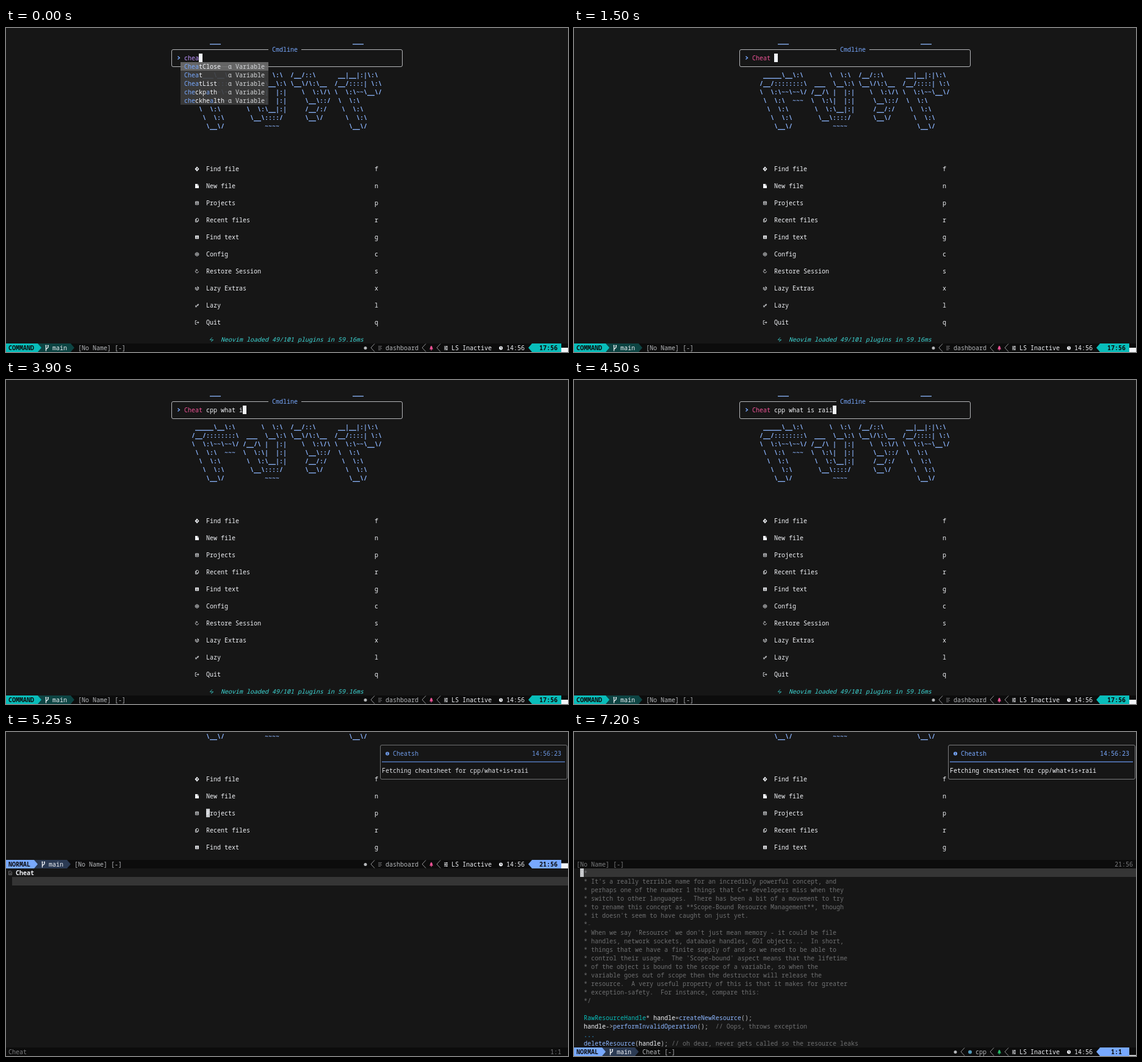
Recreate the animation shown at these times as an HTML page with a canvas. Size 921x532 px, loop 8000 ms.

```html
<!DOCTYPE html>
<html lang="en">
<head>
<meta charset="utf-8">
<title>Cheatsheet lookup in a terminal editor</title>
<style>
html, body { margin: 0; height: 100%; overflow: hidden; background: #161616; }
canvas { display: block; }
</style>
</head>
<body>
<canvas id="stage" width="921" height="532"></canvas>
<script>
const ctx = document.getElementById('stage').getContext('2d');
const W = 921, H = 532, LOOP = 8000, CELL = 6, LINE = 14;
const FONT = '10px "Noto Sans Mono", "DejaVu Sans Mono", monospace';
const C = {
  bg: '#161616', bar: '#0c0c0c', fg: '#f2f4f8', soft: '#b6b8bb', dim: '#7b7c7e', comment: '#6e6f70',
  blue: '#78a9ff', sky: '#8cb6ff', teal: '#08bdba', cyan: '#3ddbd9', pink: '#ee5396',
  purple: '#be95ff', green: '#25be6a', line: '#353535'
};

const BANNER = [
  [1, '     ___                                    ___'],
  [5, String.raw` _____\__\:\       \  \:\  /__/::\      __|__|:|\:\ `],
  [6, String.raw`/__/::::::::\  ___  \__\:\ \__\/\:\__  /__/::::| \:\ `],
  [7, String.raw`\  \:\~~\~~\/ /__/\ |  |:|    \  \:\/\ \  \:\~~\__\/ `],
  [8, String.raw` \  \:\  ~~~  \  \:\|  |:|     \__\::/  \  \:\ `],
  [9, String.raw`  \  \:\       \  \:\__|:|     /__/:/    \  \:\ `],
  [10, String.raw`   \  \:\       \__\::::/      \__\/      \  \:\ `],
  [11, String.raw`    \__\/           ~~~~                   \__\/ `]
];

// Icon paths are centred on their cell.
const MENU = [
  ['Find file', 'f', 'M0-4L3.5 0L0 4L-3.5 0ZM-.6-1.5v1h1v1h-1v1h1.2v-1h.6v-2Z', 'evenodd'],
  ['New file', 'n', 'M-3-3.5H1V-1H3V3.5H-3ZM1.7-3.5L3-1.8H1.7Z', 'nonzero'],
  ['Projects', 'p', 'M-2.5-2.5H2.5V2.5H-2.5ZM-2.5-.5H2.5M-1 1H1M0-2.5V-.5'],
  ['Recent files', 'r', 'M-1-3H1.5L2.5-2V1.5H-1ZM-1-1.5H-2.5V3H.8V1.5'],
  ['Find text', 'g', 'M-3-2.7H3V2.7H-3ZM-2-1V-.4H2V-1ZM-2 .8V1.4H2V.8Z', 'evenodd'],
  ['Config', 'c', 'M0-3L2.7-1.5V1.5L0 3L-2.7 1.5V-1.5ZM-1-.8H1V.8H-1Z'],
  ['Restore Session', 's', 'M-1.5-2A2.5 2.5 0 1 0 2.4 0M-1.8-3L1-2.2L-1-.4'],
  ['Lazy Extras', 'x', 'M0-3L2.6-1.6V1.6L0 3L-2.6 1.6V-1.6L0 0L2.6-1.6M0 0V3'],
  ['Lazy', 'l', 'M-3 2.3H-.5L-2.5 .6H0M-.3 .3H2L.3-1.2H3L1.6-2.4'],
  ['Quit', 'q', 'M-.5-3H-2.7V3H-.5M-1 0H3M1.3-1.7L3 0L1.3 1.7']
];

const COMMENT = `/*
 * It's a really terrible name for an incredibly powerful concept, and
 * perhaps one of the number 1 things that C++ developers miss when they
 * switch to other languages.  There has been a bit of a movement to try
 * to rename this concept as **Scope-Bound Resource Management**, though
 * it doesn't seem to have caught on just yet.
 *
 * When we say 'Resource' we don't just mean memory - it could be file
 * handles, network sockets, database handles, GDI objects...  In short,
 * things that we have a finite supply of and so we need to be able to
 * control their usage.  The 'Scope-bound' aspect means that the lifetime
 * of the object is bound to the scope of a variable, so when the
 * variable goes out of scope then the destructor will release the
 * resource.  A very useful property of this is that it makes for greater
 * exception-safety.  For instance, compare this:
 */`.split('\n');

const CODE = [
  ['RawResourceHandle', C.teal, '* ', C.soft, 'handle', C.fg, '=', C.soft, 'createNewResource', C.sky, '();', C.soft],
  ['handle', C.fg, '->', C.soft, 'performInvalidOperation', C.sky, '();', C.soft, '  // Oops, throws exception', C.comment],
  ['...', '#33b1ff'],
  ['deleteResource', C.sky, '(', C.soft, 'handle', C.fg, ');', C.soft,
    ' // oh dear, never gets called so the resource leaks', C.comment]
];

const TYPED = [
  [0, 'chea'], [300, 'cheat'], [750, 'CheatClose'], [1050, 'Cheat'], [1500, 'Cheat '],
  [2550, 'Cheat c'], [2850, 'Cheat cp'], [3000, 'Cheat cpp'], [3150, 'Cheat cpp '],
  [3300, 'Cheat cpp w'], [3450, 'Cheat cpp wh'], [3600, 'Cheat cpp what'], [3750, 'Cheat cpp what '],
  [3900, 'Cheat cpp what i'], [4050, 'Cheat cpp what is '], [4200, 'Cheat cpp what is r'],
  [4350, 'Cheat cpp what is ra'], [4500, 'Cheat cpp what is raii']
];
const FADE = [[4800, .07], [4950, .4], [5100, .7], [5250, .9], [5400, 1]];
const COMPLETIONS = ['CheatClose', 'Cheat', 'CheatList', 'checkpath', 'checkhealth'];

const valueAt = (steps, t) => steps.filter(([start]) => start <= t).pop()[1];

function rect(x, y, w, h, color) {
  ctx.fillStyle = color;
  ctx.fillRect(x, y, w, h);
}

function text(x, row, str, color = C.fg, style = '') {
  ctx.font = `${style} ${FONT}`;
  ctx.fillStyle = color;
  ctx.fillText(str, x, row * LINE + 11);
}

function segments(x, row, parts) {
  for (let i = 0; i < parts.length; i += 2) {
    text(x, row, parts[i], parts[i + 1]);
    x += parts[i].length * CELL;
  }
}

function icon(x, row, d, color = C.fg, fillRule, width = .8) {
  ctx.save();
  ctx.translate(x + 3, row * LINE + 7.5);
  ctx.fillStyle = ctx.strokeStyle = color;
  ctx.lineWidth = width;
  const path = new Path2D(d);
  if (fillRule) ctx.fill(path, fillRule); else ctx.stroke(path);
  ctx.restore();
}

function disc(x, row, color, r = 3) {
  ctx.fillStyle = color;
  ctx.beginPath();
  ctx.arc(x + 3, row * LINE + 7.5, r, 0, 7);
  ctx.fill();
}

function clock(x, row) {
  disc(x, row, C.fg);
  icon(x, row, 'M0-2V.3H1.5', C.bar);
}

function info(x, row) {
  disc(x, row, C.blue);
  rect(x + 2.5, row * LINE + 5.5, 1, 1, C.bg);
  rect(x + 2.5, row * LINE + 7, 1, 2.3, C.bg);
}

// Solid separator: dir 1 points right, -1 points left.
function arrow(x, row, dir, color) {
  const y = row * LINE, base = dir > 0 ? x : x + CELL;
  ctx.fillStyle = color;
  ctx.beginPath();
  ctx.moveTo(base, y);
  ctx.lineTo(base + dir * CELL, y + 7);
  ctx.lineTo(base, y + LINE);
  ctx.fill();
}

function roundBox(x, y, w, h, color) {
  ctx.strokeStyle = color;
  ctx.lineWidth = 1;
  ctx.beginPath();
  ctx.roundRect(x, y, w, h, 2.5);
  ctx.stroke();
}

function dashboard(shift) {
  for (const [row, str] of BANNER) text(304, row - shift, str, C.sky, 'bold');
  MENU.forEach(([label, key, d, fillRule], i) => {
    const row = 16 + i * 2 - shift;
    icon(310, row, d, C.fg, fillRule);
    text(328, row, label);
    text(604, row, key);
  });
  icon(334, 36 - shift, 'M1-3.3L-2.7 .5H2.7L-1 3.5', C.cyan);
  text(352, 36 - shift, 'Neovim loaded 49/101 plugins in 59.16ms', C.cyan, 'italic');
}

function statusline(row, s) {
  const y = row * LINE, edge = 4 + (s.mode.length + 1) * CELL;
  rect(0, y, W, LINE, C.bar);
  rect(edge, y, 54, LINE, s.shade);
  arrow(edge + 54, row, 1, s.shade);
  rect(0, y, edge, LINE, s.color);
  arrow(edge, row, 1, s.color);
  text(4, row, s.mode, C.bar, 'bold');
  icon(edge + 12, row, 'M-1.5-5V5M-1.5 2L2-1V-4M-2.5-4H-.5M1-4H3', C.fg, '', 1.3);
  text(edge + 24, row, 'main');
  text(edge + 66, row, s.file, C.soft);

  const typeX = 676 - s.type.length * CELL;
  disc(typeX - 36, row, C.soft, 2.5);
  for (const x of [typeX - 24, 682, 706]) icon(x, row, 'M3-7L-3-.5L3 6', C.soft);
  if (s.type === 'cpp') disc(typeX - 12, row, '#519aba');
  else icon(typeX - 12, row, 'M-3-3H3M-3-1H2M-3 1H3M-3 3H1', C.dim);
  text(typeX, row, s.type, C.soft);
  icon(694, row, 'M0-4L2.3-1H1.4L3 2H.6V4H-.6V2H-3L-1.4-1H-2.3Z', s.tree, 'nonzero');
  icon(718, row, 'M-3-2.5H3M-3 0H3M-3 2.5H3M1.2-3.5V-1.5M-1.2-1V1M1.2 1.5V3.5', C.fg, '', 1);
  text(730, row, 'LS Inactive');
  clock(808, row);
  text(820, row, '14:56');
  arrow(856, row, -1, s.color);
  rect(862, y, 48, LINE, s.color);
  text(s.pos.length > 3 ? 874 : 880, row, s.pos, C.bar, 'bold');
  rect(910, y + LINE - s.scroll, 11, s.scroll, C.fg);
}

function inactiveStatus(row, file, pos) {
  rect(0, row * LINE, W, LINE, C.bar);
  text(4, row, file, C.dim);
  text((pos.length > 3 ? 916 : 910) - pos.length * CELL, row, pos, C.dim);
}

function popup(query, selected) {
  COMPLETIONS.forEach((name, i) => {
    const row = 4 + i, y = row * LINE, active = i === selected;
    const back = active ? '#656565' : '#393939';
    ctx.globalAlpha = .9;
    rect(286, y, 144, LINE, active ? '#6e6e6e' : '#3d3d3d');
    ctx.globalAlpha = 1;
    rect(292, y, name.length * CELL, LINE, back);
    rect(364, y, 60, LINE, back);
    let matched = 0;
    [...name].forEach((ch, k) => {
      const hit = ch.toLowerCase() === query[matched];
      if (hit) matched++;
      text(292 + k * CELL, row, ch, hit ? C.blue : C.fg);
    });
    text(364, row, 'α Variable', '#d8dadd');
  });
}

function cmdline(t) {
  const str = valueAt(TYPED, t);
  rect(268, 28, 384, 42, C.bg);
  roundBox(271.5, 35.5, 378, 28, C.soft);
  rect(430, 28, 54, LINE, C.bg);
  text(436, 2, 'Cmdline', C.blue);
  icon(280, 3, 'M-1.5-3L1.5-.5L-1.5 2', C.blue, '', 1.4);
  if (t < 750) text(292, 3, str, C.purple);
  else segments(292, 3, [str.split(' ')[0], C.pink, str.includes(' ') ? str.slice(5) : '', C.fg]);
  rect(292 + str.length * CELL, 42, CELL, LINE, C.fg);
  if (t < 1500) popup(t < 450 ? 'chea' : 'cheat', t < 1050 ? 0 : 1);
}

function sheet(top) {
  COMMENT.forEach((str, i) => text(10, top + i, str, C.comment));
  text(22, top + 6, '-', '#3c3c3c');
  CODE.forEach((parts, i) => segments(16, top + 17 + i, parts));
}

function notification(t) {
  ctx.globalAlpha = valueAt(FADE, t);
  roundBox(613.5, 21.5, 306, 56, C.dim);
  info(622, 2);
  text(634, 2, 'Cheatsh', C.blue);
  text(862, 2, '14:56:23', C.blue);
  rect(616, 48, 300, 2, '#4a68a0');
  text(616, 4, 'Fetching cheatsheet for cpp/what+is+raii');
  ctx.globalAlpha = 1;
}

function splitView(t) {
  const focused = t >= 7200, loaded = t >= 5700;
  const normal = { mode: 'NORMAL', color: C.blue, shade: '#2b3a53' };
  dashboard(11);
  rect(0, 210, W, H - 210, C.bg);
  notification(t);
  const top = focused ? 16 : 17;
  rect(10, top * LINE, W - 10, LINE, C.line);
  if (focused) rect(10, top * LINE, CELL, LINE, '#c6c8cb');
  if (loaded) sheet(top);
  if (focused) {
    text(10, top, '/', C.fg);
    inactiveStatus(15, '[No Name] [-]', '21:56');
    statusline(37, { ...normal, file: 'Cheat [-]', type: 'cpp', tree: C.green, pos: '1:1', scroll: 1.5 });
  } else {
    rect(328, 126, CELL, LINE, '#c6c8cb');
    text(328, 9, 'P');
    statusline(15, { ...normal, file: '[No Name] [-]', type: 'dashboard', tree: C.pink, pos: '21:56', scroll: 8.5 });
    icon(4, 16, 'M-2.5-3H1L2.5-1.5V3H-2.5ZM-1.2 0H1.2M-1.2 1.5H1.2', C.dim);
    text(16, 16, 'Cheat', C.fg, 'bold');
    inactiveStatus(37, loaded ? 'Cheat [-]' : 'Cheat', '1:1');
  }
}

function draw() {
  const t = performance.now() % LOOP;
  rect(0, 0, W, H, C.bg);
  if (t < 4800) {
    dashboard(0);
    statusline(37, {
      mode: 'COMMAND', color: C.teal, shade: '#0d4443', file: '[No Name] [-]',
      type: 'dashboard', tree: C.pink, pos: '17:56', scroll: 7
    });
    cmdline(t);
  } else splitView(t);
  requestAnimationFrame(draw);
}
draw();
</script>
</body>
</html>
```
